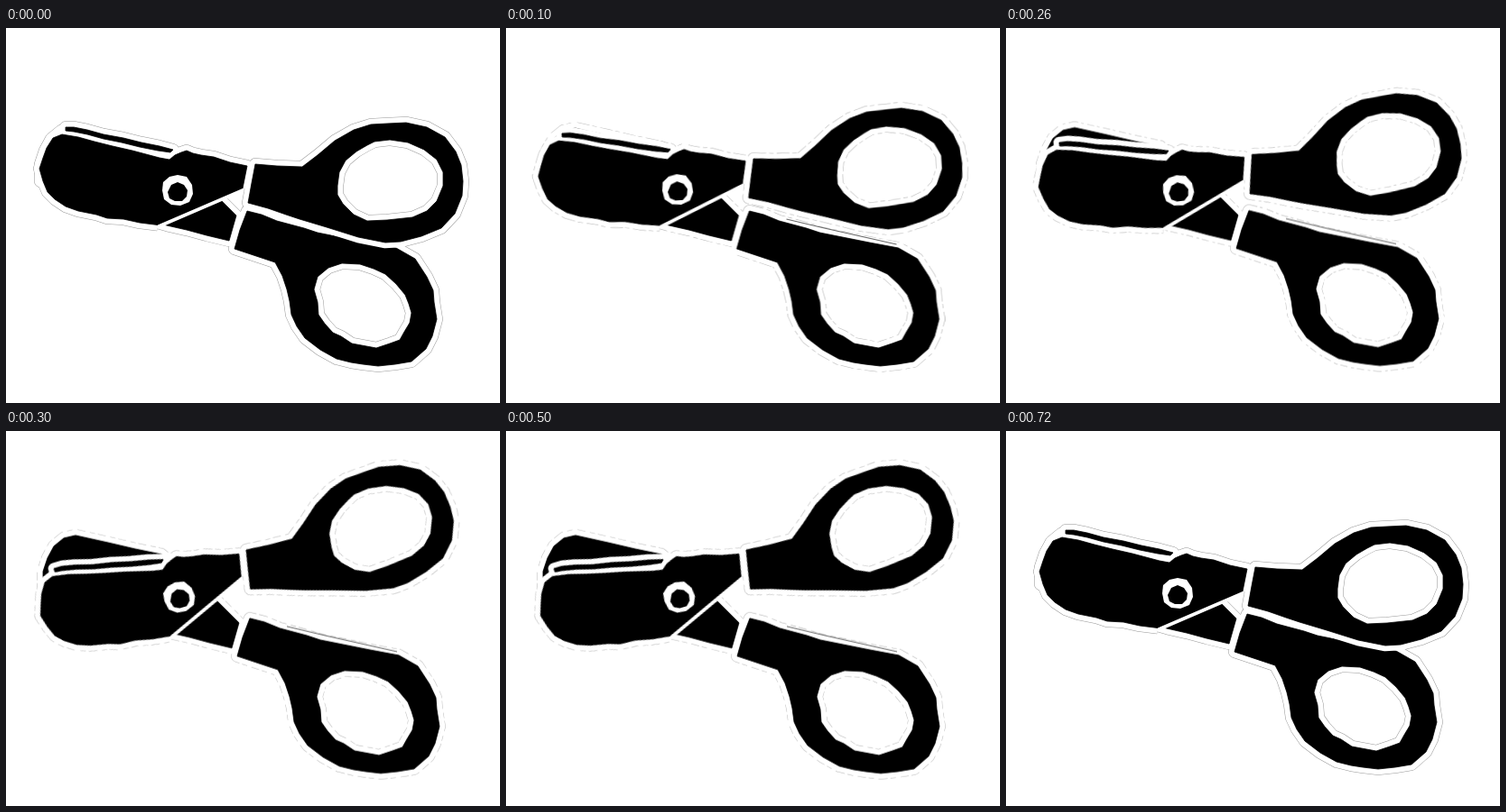
Recreate the animation shown at these times as an HTML page. Size 547 by 416 pixels, loop 0.8 s.

```html
<!DOCTYPE html>
<html lang="en">
<head>
<meta charset="utf-8">
<title>Scissors</title>
<style>
html, body { margin: 0; width: 100%; height: 100%; overflow: hidden; background: #fff; }
svg { display: block; width: 100%; height: 100%; }
svg * { stroke-linejoin: round; fill-rule: evenodd; }

.front, .rear, .hair, .seam { animation: .8s step-end infinite; }
.front { animation-name: snip; transform-origin: 190px 180.5px; }
.rear { animation-name: shift; }
.hair { animation-name: wear; fill: none; stroke: #999; stroke-width: 13.6; }
.seam { animation-name: seam; fill: none; stroke: #222; stroke-width: .9; }
.border { fill: #fff; stroke: #fff; stroke-width: 12.6; }
.ink { fill: #000; stroke: #000; stroke-width: .8; }

@keyframes snip {
  0%, 75% { transform: none; }
  12.5% { transform: translate(0, -.8px) rotate(-3.5deg); }
  25% { transform: translate(1px, .2px) rotate(-7.5deg); }
  37.5%, 62.5% { transform: translate(2px, 4.2px) rotate(-16.6deg); }
  50% { transform: translate(1px, 4.2px) rotate(-23.5deg); }
}
@keyframes shift {
  0%, 75% { transform: none; }
  12.5% { transform: translate(2.5px, 0); }
  25% { transform: translate(2px, -.5px); }
  37.5%, 62.5% { transform: translate(3px, 4.7px); }
  50% { transform: translate(1px, 4.2px); }
}
/* The cut line is crisp when closed and patchy while moving. */
@keyframes wear {
  0%, 75% { stroke-dasharray: none; opacity: 1; }
  12.5% { stroke-dasharray: 14 3 5 4; opacity: .7; }
  25% { stroke-dasharray: 8 3 3 4; opacity: .65; }
  37.5%, 62.5% { stroke-dasharray: 6 3 9 5; opacity: .65; }
  50% { stroke-dasharray: 7 4 3 4; opacity: .65; }
}
@keyframes seam {
  0%, 75% { opacity: 0; }
  12.5% { opacity: .8; }
}
</style>
</head>
<body>
<svg viewBox="0 0 547 416">
  <defs>
    <g id="top">
      <!-- The blade stays open along its cutting edge, where the border is thinner. -->
      <path d="M262 178L267 153 248 149 239 146 230 143 216 141 207 139 200 136 194 138 187 141 181 146
        170 144 140 136 118 131 98 126 80 121 62 118 52 122 45 133 41 144 37 156 41 170 46 182 54 190
        66 198 80 203 100 207 112 211 130 212 148 216 168 218.5"/>
      <path d="M66 110L75 110 90 113 108 118 130 122 150 127 170 131 185 135 182 138 168 136 148 132
        128 127 108 123 90 118 75 115 66 114Z"/>
      <path d="M276 151L300 153 328 154 345 141 364 125 385 113 404 107 422 106 443 105 466 110 486 121
        498 137 504 152 506 170 505 186 497 206 482 222 460 231 437 237 420 238 390 232 355 221
        325 212 310 207 290 200 268 194 272 172Z
        M367 175L367 185 373 195 385 207 400 214 422 213 450 210 466 203 477 192 484 175 484 160
        477 146 463 135 445 127 425 124 408 126 400 130 388 137 376 147 369 160Z"/>
    </g>
    <g id="bottom">
      <path d="M38 170L38 151 43 136 50 123 61 114 74 111 110 119 140 126 169 132 225 178 238 191 255 208
        247 236 222 230 200 224 178 219 150 211 70 185Z"/>
      <path d="M267 203L283 207 300 214 330 222 345 227 370 232 400 238 432 244 453 256 466 276 473 291
        474 304 477 323 472 342 465 356 449 370 431 373 412 375 395 373 382 371 366 367 348 357
        331 344 322 331 316 318 314 303 311 290 306 275 298 260 280 254 253 245 259 224Z
        M341 290L345 304 346 318 353 328 362 338 371 342 383 350 410 355 425 350 436 346 441 337
        447 327 449 316 446 306 442 296 432 284 420 273 407 267 392 262 372 261 357 266 345 276Z"/>
    </g>
  </defs>

  <g class="rear">
    <use href="#bottom" class="hair"/>
  </g>
  <g class="front">
    <use href="#top" class="hair"/>
  </g>

  <g class="rear">
    <use href="#bottom" class="border"/>
    <use href="#bottom" class="ink"/>
    <path class="seam" d="M308 212L350 222 390 231 430 240"/>
  </g>

  <g class="front">
    <use href="#top" class="border"/>
    <path d="M262 178L168 218.5" stroke="#fff" stroke-width="7.4"/>
    <use href="#top" class="ink"/>
    <path fill="#fff" d="M181 165L190 163 200 165 206 174 207 184 203 193 193 197 183 196 175 190 173 180 174 171Z"/>
    <path fill="#000" d="M183 174L190 171 197 174 201 180 200 187 195 192 187 192 181 189 179 182Z"/>
  </g>
</svg>
</body>
</html>
```
